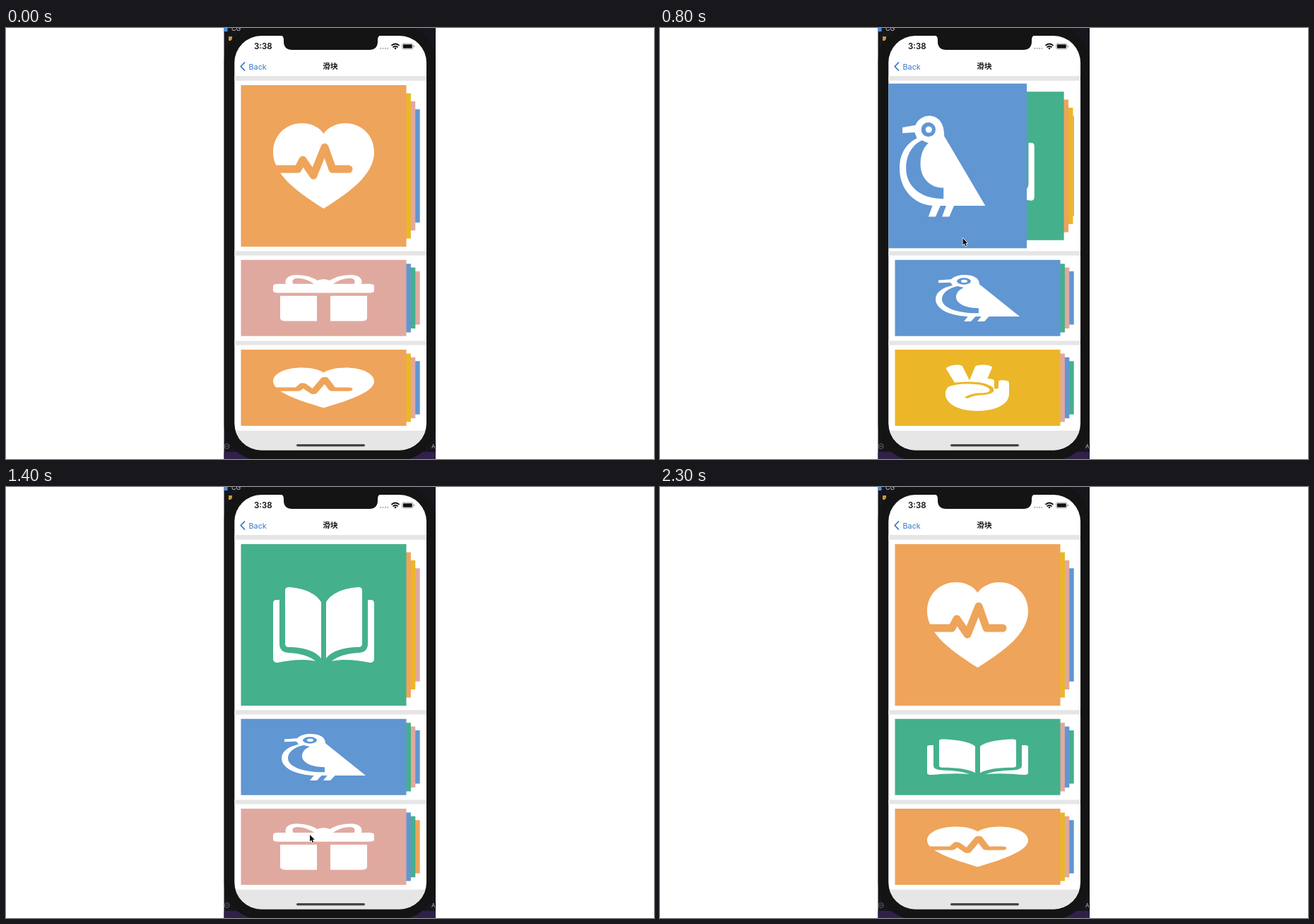
Animation of 917 by 611 pixels, one loop 2.4 s. Source, as an HTML page with a canvas:

```html
<!DOCTYPE html>
<html lang="zh">
<head>
<meta charset="utf-8">
<title>Card stacks</title>
<style>
html, body { margin: 0; width: 100%; height: 100%; overflow: hidden; background: #fff; }
canvas { display: block; }
</style>
</head>
<body>
<canvas id="stage" width="917" height="611"></canvas>
<script>
const ctx = document.getElementById('stage').getContext('2d');
const LOOP = 2400, STEP = 100;
const CX = 449.5, CY = 195.5, CARD_W = 234, CARD_H = 229;

const mirrored = d => {
  const path = new Path2D(d);
  path.addPath(new Path2D(d), new DOMMatrix([-1, 0, 0, 1, 2 * CX, 0]));
  return path;
};
const white = path => ({ path: new Path2D(path) });
const cut = path => ({ path: new Path2D(path), cut: true });
const line = (path, width, cut) => ({ path: new Path2D(path), width, cut });

const heart = { color: '#eea45a', parts: [
  white('M449.5 150C455 141 468 135 480 135C504 135 521 153 521 176C521 208 486 233 449.5 256C413 233 378 208 378 176C378 153 395 135 419 135C432 135 444 141 449.5 150Z'),
  line('M370 200H413L420 187L435 209L451 169L462 200H485', 11, true)
] };
const hand = { color: '#ebb728', parts: [
  white('M404 214C404 192 414 178 432 176L462 168Q473 168 473 176V196C473 200 479 200 479 196V176C479 171 494 171 494 180V214C494 246 474 265 449 265C422 265 404 243 404 214Z'),
  white('M405 139C404 130 424 121 428 131L438 173L446 132C447 124 470 124 470 135L460 184H418Z'),
  line('M406 190C420 178 448 178 460 187C474 197 472 212 458 214C446 214 440 218 435 224', 6, true)
] };
const gift = { color: '#e0a9a0', parts: [
  { path: mirrored('M388 189H440V265H397Q388 265 388 256Z') },
  white('M385 153H514Q521 153 521 160V173Q521 180 514 180H385Q378 180 378 173V160Q378 153 385 153Z'),
  white('M437 154C437 134 462 134 462 154Z'),
  { path: mirrored('M441 151C430 135 419 131 412 131C402 131 398 142 402 156'), width: 10 }
] };
const bird = { color: '#6096d2', parts: [
  white('M394 142L412 139C416 130 424 126 431 126C443 126 452 135 452 154L509 251H440C410 251 390 228 390 199C390 178 400 164 414 157L411 149L394 150Z'),
  cut('M421 160C408 166 399 180 399 199C399 224 420 242 451 241V226C432 226 419 212 419 193C419 180 423 170 430 164Z'),
  cut('M420 145A10 10 0 0 1 440 145A10 10 0 0 1 420 145'),
  white('M426 145A4.5 4.5 0 0 1 435 145A4.5 4.5 0 0 1 426 145'),
  white('M436 250H447L440 266H430ZM455 250H466L459 266H449Z')
] };
const book = { color: '#45b08c', parts: [
  { path: mirrored('M395 147Q395 142 400 142C420 143 438 150 446 163V243C438 232 420 227 400 227Q395 227 395 222Z') },
  { path: mirrored('M378 165Q378 160 383 160H387V222Q387 234 399 235C418 236 430 240 438 247C420 243 400 246 384 249Q378 249 378 243Z') }
] };

// Keys are [step, value, ...]
const five = [heart, hand, gift, bird, book];
const stacks = [
  { y: CY, h: CARD_H, cards: five,
    keys: [[0, 0], [1, 1], [4, 1], [5, 1.4], [6, 1.97], [7, 2.4], [8, 3.2], [9, 4], [17, 4], [18, 5]] },
  { y: 382.8, h: 108, cards: [gift, bird, book],
    keys: [[0, 0], [1, 1], [9, 1], [10, 1.26], [11, 2], [12, 2.4], [13, 3.4], [14, 4], [21, 4], [22, 5]] },
  { y: 510, h: 108, cards: five,
    keys: [[0, 0], [1, 1], [9, 1], [10, 1.03], [11, 2], [14, 2], [15, 2.4], [16, 3.2], [17, 4], [19, 4], [20, 4.056], [21, 4.8], [22, 5]] }
];
const cursorKeys = [[3, 510, 215], [6, 471, 206], [10, 386, 390], [14, 430, 493], [17, 426, 455], [18, 481, 492], [20, 481, 492], [22, 425, 495]];

function sample(keys, step) {
  const next = keys.findIndex(k => k[0] > step);
  if (next < 0) return keys[keys.length - 1].slice(1);
  const a = keys[Math.max(0, next - 1)], b = keys[next];
  const u = Math.max(0, (step - a[0]) / (b[0] - a[0]));
  return a.slice(1).map((v, i) => v + (b[i + 1] - v) * u);
}

function rect(color, x, y, w, h, r = 0) {
  ctx.fillStyle = color;
  ctx.beginPath();
  ctx.roundRect(x, y, w, h, r);
  ctx.fill();
}

function stroke(color, width, d) {
  ctx.strokeStyle = color;
  ctx.lineWidth = width;
  ctx.lineCap = ctx.lineJoin = 'round';
  ctx.stroke(new Path2D(d));
}

function text(str, x, y, font, color, align = 'left') {
  ctx.font = font;
  ctx.fillStyle = color;
  ctx.textAlign = align;
  ctx.fillText(str, x, y);
}

function drawCard({ color, parts }, depth, stack) {
  const scale = 1 - 0.1 * depth;
  ctx.save();
  ctx.translate(CX + depth * (depth < 0 ? 249 : 18.1), stack.y);
  ctx.scale(scale, scale * stack.h / CARD_H);
  ctx.translate(-CX, -CY);
  rect(color, CX - CARD_W / 2, CY - CARD_H / 2, CARD_W, CARD_H);
  ctx.lineCap = ctx.lineJoin = 'round';
  for (const part of parts) {
    ctx.fillStyle = ctx.strokeStyle = part.cut ? color : '#fff';
    ctx.lineWidth = part.width || 1;
    part.width ? ctx.stroke(part.path) : ctx.fill(part.path);
  }
  ctx.restore();
}

function drawStack(stack, step) {
  const [pos] = sample(stack.keys, step);
  const first = Math.floor(pos), shift = pos - first;
  for (let i = shift ? 4 : 3; i >= 0; i--)
    drawCard(stack.cards[(first + i) % stack.cards.length], i - shift, stack);
}

function drawDesktop() {
  rect('#fff', 0, 0, 917, 611);
  rect('#17161d', 308.5, 0, 299.5, 611);
  rect('#30204a', 308.5, 601, 299.5, 10);
  rect('#4a8fe0', 308.5, 0, 5, 5);
  rect('#c9982f', 315, 12, 5, 6);
  text('CG', 319, 4, '9px Inter, sans-serif', '#ccc');
  text('AI', 602, 596, '8px Inter, sans-serif', '#bbb');
  ctx.save();
  ctx.beginPath();
  ctx.rect(308.5, 0, 299.5, 611);
  ctx.clip();
  stroke('#666', 1, 'M309 593A3.5 3.5 0 0 1 316 593A3.5 3.5 0 0 1 309 593M311 593H314');
  rect('#141414', 308.5, -4, 299.5, 617, 52);
  ctx.restore();
}

function drawBars() {
  ctx.fillStyle = '#141414';
  ctx.fill(new Path2D('M388 10Q393 11 393 17V19Q393 31 405 31H514Q526 31 526 19V17Q526 11 531 10Z'));
  text('3:38', 351, 30, '600 11.5px Inter, sans-serif', '#111');
  for (let i = 0; i < 4; i++) rect('#b5b5b5', 529 + i * 3.4, 27.8, 2.2, 2.2, 1);
  stroke('#111', 1.7, 'M546 24.5Q551 20.5 556 24.5M548 27Q551 24.7 554 27');
  rect('#111', 549.7, 27.6, 2.6, 2.6, 1.3);
  ctx.strokeStyle = '#999';
  ctx.lineWidth = 0.8;
  ctx.beginPath();
  ctx.roundRect(560.5, 22, 15.5, 8, 2.3);
  ctx.stroke();
  rect('#111', 561.8, 23.2, 13, 5.6, 1.2);
  rect('#999', 576.8, 24.6, 1.2, 2.8, 0.6);

  stroke('#3478c6', 1.8, 'M337.5 49L332.3 54.5L337.5 60');
  text('Back', 343.5, 58.5, '10.8px Inter, sans-serif', '#3478c6');
  text('滑块', 459, 58.3, 'bold 10.7px "Noto Sans CJK SC", "Noto Sans CJK", sans-serif', '#111', 'center');
}

function drawCursor(step) {
  if (step < 3 || step > 22) return;
  const [x, y] = sample(cursorKeys, step);
  ctx.save();
  ctx.translate(x, y);
  const arrow = 'M0 0V9.5L2.2 7.5L3.8 11.2L5.4 10.5L3.9 7H6.8Z';
  stroke('#fff', 1.4, arrow);
  ctx.fillStyle = '#111';
  ctx.fill(new Path2D(arrow));
  ctx.restore();
}

function draw(step) {
  drawDesktop();
  ctx.save();
  ctx.beginPath();
  ctx.roundRect(323.3, 11, 271.7, 587.5, 38);
  ctx.clip();
  rect('#fff', 323, 11, 272, 588);
  for (const [y, h] of [[68, 6.8], [316.3, 6.2], [443.5, 6], [570.7, 28]])
    rect('#e6e6e6', 323, y, 272, h);
  ctx.save();
  ctx.beginPath();
  ctx.rect(323, 68, 263, 503);
  ctx.clip();
  stacks.forEach(stack => drawStack(stack, step));
  ctx.restore();
  drawBars();
  rect('#444', 411, 590, 97, 3.2, 1.6);
  ctx.restore();
  drawCursor(step);
}

const start = performance.now();
function tick() {
  draw(Math.floor((performance.now() - start) % LOOP / STEP));
  requestAnimationFrame(tick);
}
tick();
</script>
</body>
</html>
```
